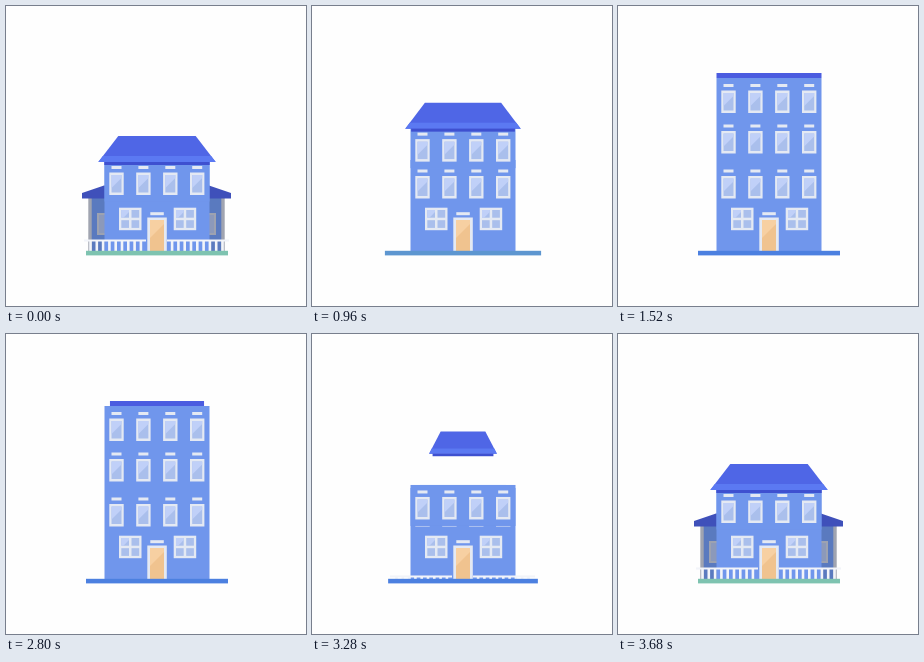
These frames come from a looping animation (300 px wide and 300 px high, 4400 ms). An HTML page:

```html
<!DOCTYPE html>
<html lang="en">
<head>
<meta charset="utf-8">
<title>Growing house</title>
<style>
  html, body { margin: 0; width: 100%; height: 100%; overflow: hidden; background: #fefefe; }
  svg { display: block; width: 100vw; height: 100vh; }
</style>
</head>
<body>
<svg id="stage" viewBox="0 0 300 300"></svg>
<script>
const LOOP = 4400, STEP = 40, MID = 151;
const WALL = '#7096ec', FRAME = '#e4e9f3', PANE = '#aabfec', SHINE = '#c0d0f8', RAIL = '#f2f4f9';

const rect = (x, y, w, h, fill) =>
  `<rect x="${x}" y="${y}" width="${w}" height="${h}" fill="${fill}"/>`;
const poly = (points, fill) => `<polygon points="${points}" fill="${fill}"/>`;
const group = (id, body) => `<g id="${id}">${body}</g>`;
const mirror = body => `<g transform="translate(301 0) scale(-1 1)">${body}</g>`;

function tallWindow(cx, y) {
  const l = cx - 5, t = y + 2.5;
  return rect(l, y - 6.5, 10, 3, FRAME) +
    rect(cx - 7.2, y, 14.4, 22.5, FRAME) +
    rect(l, t, 10, 17.5, PANE) +
    poly(`${l},${t} ${l + 10},${t} ${l + 10},${t + 3} ${l},${t + 13}`, SHINE);
}

function floor(top, bottom, windowY) {
  let s = rect(98.5, top, 105, bottom - top, WALL);
  for (let i = 0; i < 4; i++) s += tallWindow(110.5 + i * 26.9, windowY);
  return s;
}

function crossWindow(x) {
  let s = rect(x, 201.7, 22.5, 22.5, FRAME);
  for (const dx of [2.3, 12.5]) for (const dy of [2.3, 12.5])
    s += rect(x + dx, 201.7 + dy, 7.7, 7.7, PANE);
  return s + poly(`${x + 2.3},204 ${x + 10},204 ${x + 10},206 ${x + 4.5},211.7 ${x + 2.3},211.7`, SHINE);
}

const door = rect(144.3, 206.2, 13.5, 3, FRAME) +
  rect(141.3, 211.5, 19.5, 33.5, FRAME) +
  rect(144, 214, 14, 31, '#f0c38f') +
  poly('144,214 158,214 158,218 144,232', '#f7d0a2');

const base = floor(154, 245, 170) + crossWindow(113) + crossWindow(167.7) + door;

// The wing reaches behind the main wall so that it can swing outwards.
const wing = rect(84, 192, 20, 53, '#5a7abf') +
  rect(91, 207, 13, 22, '#9da2b0') +
  rect(93, 209, 11, 18, '#8c99ba') +
  rect(82.3, 192, 3.4, 53, '#a0a4b0') +
  poly('76,187 98,179.5 104,179.5 104,192.5 76,192.5', '#3f50ba');

function fenceHalf() {
  let s = rect(78, 233.5, 62, 2, RAIL);
  for (let i = 0; i < 9; i++) s += rect(83.2 + i * 6.3, 235, 2.6, 14, RAIL);
  return s;
}

const roof = poly('112.3,130 189.7,130 209.7,156 92.3,156', '#4f66e6') +
  poly('96.9,150 205.1,150 209.7,156 92.3,156', '#5b79f2') +
  rect(98.3, 156, 105.4, 3, '#3e50d0');

document.getElementById('stage').innerHTML =
  '<clipPath id="above"><rect width="300" height="245"/></clipPath>' +
  group('left', wing) + mirror(group('right', wing)) +
  group('upper', floor(72, 113, 84.5)) +
  group('cap', rect(98.5, 67, 105, 5, '#4b5ce0')) +
  base +
  group('middle', floor(113, 154, 125)) +
  `<g clip-path="url(#above)">${group('fence', fenceHalf() + mirror(fenceHalf()))}</g>` +
  group('ground', rect(80, 244.8, 142, 4.6, 'currentColor')) +
  group('roof', roof);

const span = (t, a, b) => Math.min(1, Math.max(0, (t - a) / (b - a)));
const smooth = u => u * u * (3 - 2 * u);
const inBack = (u, s = 2.4) => u * u * ((s + 1) * u - s);
const outBack = (u, s) => 1 - inBack(1 - u, s);
const pulse = u => Math.min(1, 6 * u, 6 * (1 - u));

const el = id => document.getElementById(id);
const shift = (id, x, y) => el(id).setAttribute('transform', `translate(${x} ${y})`);
// Scales around (MID, from), then carries that point to height y.
function place(id, y, sx, sy = 1, from = 0) {
  el(id).setAttribute('transform', `translate(${MID} ${y}) scale(${sx} ${sy}) translate(${-MID} ${-from})`);
  el(id).style.display = sx > 0 ? '' : 'none';
}
const mix = (a, b, k) => `rgb(${a.map((v, i) => Math.round(v + (b[i] - v) * k))})`;

function draw(t) {
  const back = t > 2000;

  // Side wings, fence and ground
  const slide = inBack(back ? 1 - span(t, 3480, 3680) : span(t, 720, 920));
  shift('left', 24 * slide, 0);
  shift('right', 24 * slide, 0);
  const hide = inBack(back ? 1 - span(t, 3240, 3680) : span(t, 720, 920));
  shift('fence', 0, 14 * hide);
  const stretch = pulse(back ? span(t, 3240, 3680) : span(t, 720, 1200));
  place('ground', 0, 1 + 0.1 * stretch);
  const tint = back ? 1 - span(t, 3320, 3560) : span(t, 800, 1040);
  el('ground').style.color = mix([126, 195, 176], [76, 128, 224], tint);

  // Floors, each sliding out from the one below
  const low = back ? smooth(span(t, 2960, 3350)) : 1 - outBack(span(t, 840, 1240), 1);
  const up = smooth(back ? 1 - span(t, 2880, 3120) : span(t, 1080, 1280));
  const drop = 41.5 * low, sink = drop + 41 * (1 - up);
  shift('middle', 0, drop);
  place('upper', sink, 0.82 + 0.18 * up);
  place('cap', sink, smooth(back ? 1 - span(t, 2760, 2960) : span(t, 1280, 1520)));

  // The roof rides up on the floors and later falls back freely
  if (back) {
    const fall = smooth(span(t, 2960, 3540));
    place('roof', 72 + 87 * fall, fall, 0.65 + 0.35 * fall, 159);
  } else {
    place('roof', 117.5 + drop - 45.5 * up ** 2, 1 - span(t, 840, 1320) ** 3, 1 - 0.35 * up ** 3, 159);
  }
}

const start = performance.now();
function tick() {
  const t = (performance.now() - start) % LOOP;
  draw(Math.floor(t / STEP) * STEP);
  requestAnimationFrame(tick);
}
tick();
</script>
</body>
</html>
```
